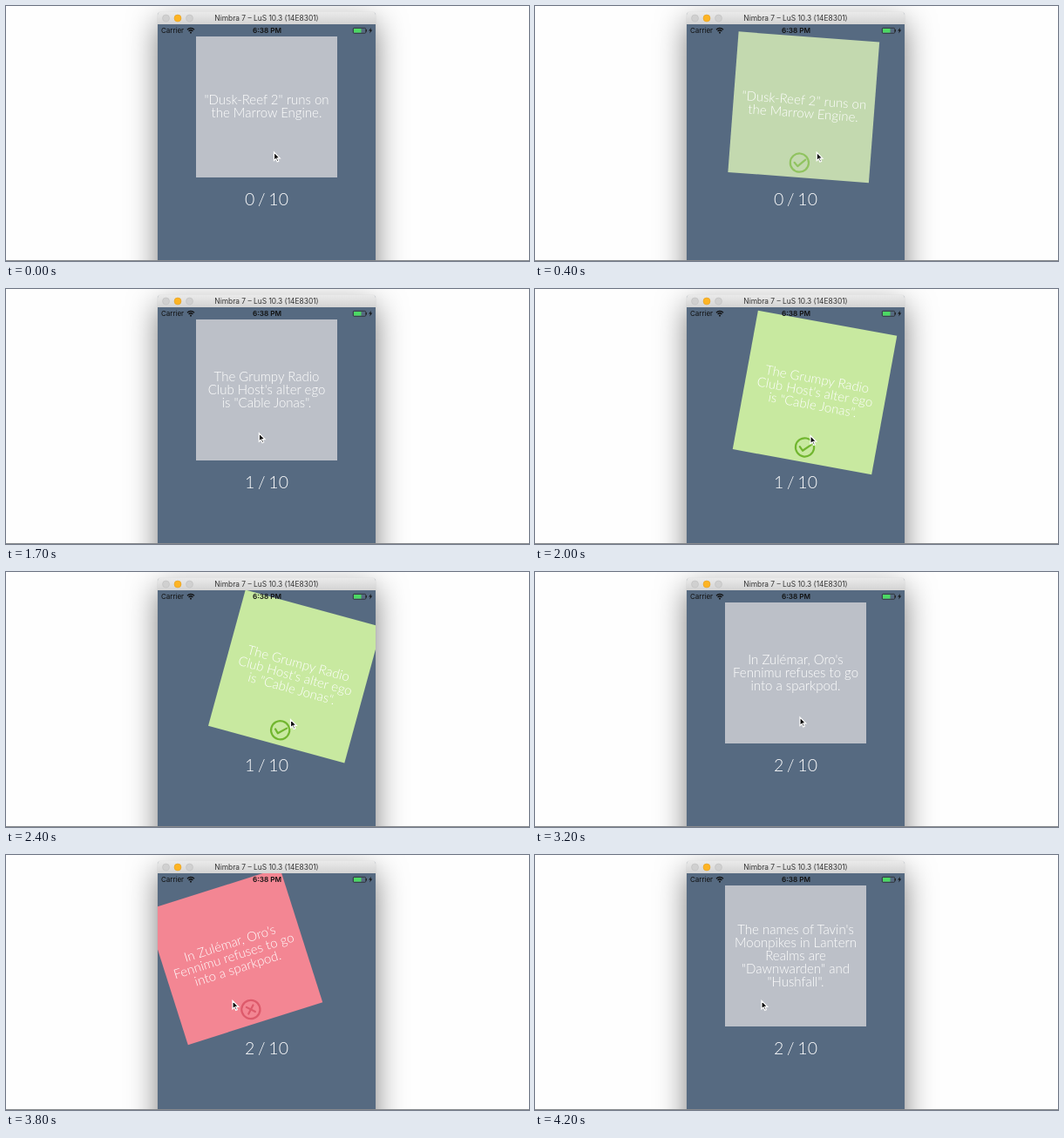
These frames come from a looping animation (600 px wide and 293 px high, 4.4 s). An HTML page:

```html
<!DOCTYPE html>
<html lang="en">
<head>
<meta charset="utf-8">
<title>Quiz cards</title>
<style>
  html, body { margin: 0; width: 100%; height: 100%; overflow: hidden; background: #fefefe; }
  #stage { position: relative; width: 600px; height: 293px; overflow: hidden; }
  #window {
    position: absolute; left: 174px; top: 6.5px; width: 250px; height: 340px;
    border-radius: 4px 4px 0 0; background: #566a81;
    box-shadow: 0 12px 34px rgba(0, 0, 0, .5), 0 0 1px rgba(0, 0, 0, .3);
  }
  svg { position: absolute; left: 0; top: 0; }
  text { text-anchor: middle; }
  .ui { font-family: Inter, "Liberation Sans", sans-serif; fill: #111; }
  .quiz { font-family: Lato, "Open Sans", sans-serif; font-weight: 300; fill: #fff; }
  .icon { fill: none; stroke-width: 2.2; stroke-linecap: round; stroke-linejoin: round; }
</style>
</head>
<body>
<div id="stage">
  <div id="window"></div>
  <svg width="600" height="293" viewBox="0 0 600 293">
    <defs>
      <linearGradient id="bar" x2="0" y2="1">
        <stop stop-color="#ebebeb"/><stop offset="1" stop-color="#d3d3d3"/>
      </linearGradient>
      <clipPath id="screen"><rect x="174" y="21" width="250" height="272"/></clipPath>
    </defs>

    <path d="M174 21V10.5a4 4 0 0 1 4-4h242a4 4 0 0 1 4 4V21Z" fill="url(#bar)"/>
    <g stroke-width=".5">
      <circle cx="183.5" cy="14" r="4" fill="#d0d0d0" stroke="#bbb"/>
      <circle cx="197" cy="14" r="4" fill="#fdb424" stroke="#dd9a20"/>
      <circle cx="210.5" cy="14" r="4" fill="#d0d0d0" stroke="#bbb"/>
    </g>
    <text class="ui" x="299" y="17" font-size="8.4" style="fill:#333">Nimbra 7 – LuS 10.3 (14E8301)</text>

    <g clip-path="url(#screen)">
      <text id="score" class="quiz" x="299" y="228.5" font-size="19.5" word-spacing="-1.5"></text>
      <g id="card">
        <rect id="face" x="-81" y="-81" width="162" height="162"/>
        <g id="lines" class="quiz" font-size="15"></g>
        <g id="icon" class="icon" transform="translate(0 64)">
          <circle r="10.6"/><path id="mark"/>
        </g>
      </g>
    </g>

    <text class="ui" x="191" y="31" font-size="8">Carrier</text>
    <g fill="none" stroke="#111" stroke-width="1.3">
      <path d="M208 27.2a5.6 5.6 0 0 1 8 0M209.6 29a3.4 3.4 0 0 1 4.8 0"/>
      <circle cx="212" cy="30.6" r=".4"/>
    </g>
    <text class="ui" x="299.5" y="31" font-size="8.2" font-weight="600">6:38 PM</text>
    <rect x="398.3" y="25.3" width="14.4" height="6" rx="1" fill="none" stroke="#222" stroke-width=".7"/>
    <rect x="399" y="26" width="8.5" height="4.6" fill="#4cd964"/>
    <path d="M413.4 27v2.6" stroke="#222"/>
    <path d="M419 24.8l-2.8 3.8h1.8l-.8 3 3-4h-1.9Z" fill="#111"/>

    <path d="M0 292.5H600" stroke="#85888c"/>
    <path id="cursor" d="M0 0V9.4L2.2 7.4 3.7 10.9 5.3 10.2 3.8 6.8H6.7Z" stroke="#fff" stroke-width="1.2"/>
  </svg>
</div>
<script>
const LOOP = 4400, STEP = 100;
const SLACK = 6.5;        // pointer travel before a drag takes hold
const DEGREES_PER_PX = 0.47;
const LINE_HEIGHT = 15;

const GRAY = [188, 192, 200];
const RIGHT = { face: [200, 233, 160], stroke: "#71b62f", mark: "M-5.8 .2L-1.8 4.2 6.6-4" };
const WRONG = { face: [243, 134, 147], stroke: "#dd5a6b", mark: "M-4-4L4 4M4-4L-4 4" };

const cards = [
  { from: 0, grab: 100, score: 0, lines: ['"Dusk-Reef 2" runs on', "the Marrow Engine."] },
  { from: 900, grab: 1600, score: 1, lines: ["The Grumpy Radio", "Club Host's alter ego", 'is "Cable Jonas".'] },
  { from: 2600, grab: 3200, score: 2, lines: ["In Zulémar, Oro's", "Fennimu refuses to go", "into a sparkpod."] },
  { from: 3900, grab: LOOP, score: 2, lines: ["The names of Tavin's", "Moonpikes in Lantern", "Realms are", '"Dawnwarden" and', '"Hushfall".'] }
];

// Pointer path: time, x, y
const path = [
  [0, 307.5, 168], [100, 307.5, 168], [700, 339, 168.5], [800, 338, 168.5],
  [1000, 338, 168.5], [1400, 287.5, 165.5], [1600, 287.5, 165.5], [2200, 326, 169.5],
  [2400, 326.5, 169.5], [2800, 326.5, 169.5], [3000, 304, 167], [3200, 304, 167],
  [3700, 259.5, 167.5], [3800, 260, 167.5], [LOOP, 260, 167.5]
];

const $ = id => document.getElementById(id);
const set = (el, attrs) => Object.entries(attrs).forEach(([k, v]) => el.setAttribute(k, v));
const mix = (a, b, p) => a + (b - a) * p;

function pointerAt(t) {
  const i = path.findIndex(key => key[0] > t);
  const [t0, x0, y0] = path[i - 1], [t1, x1, y1] = path[i];
  const p = (t - t0) / (t1 - t0), eased = p * p * (3 - 2 * p);
  return { x: mix(x0, x1, eased), y: mix(y0, y1, eased) };
}

function dragOf(card, t, pointer) {
  if (t < card.grab) return { dx: 0, dy: 0 };
  const start = pointerAt(card.grab), moved = pointer.x - start.x;
  const dx = Math.sign(moved) * Math.max(0, Math.abs(moved) - SLACK);
  return { dx, dy: dx ? pointer.y - start.y : 0 };
}

let shown;
function showCard(card) {
  if (card === shown) return;
  shown = card;
  $("score").textContent = `${card.score} / 10`;
  $("lines").replaceChildren(...card.lines.map((line, i) => {
    const text = document.createElementNS("http://www.w3.org/2000/svg", "text");
    text.textContent = line;
    text.setAttribute("y", (i - (card.lines.length - 1) / 2) * LINE_HEIGHT + 4.5);
    return text;
  }));
}

function draw(now) {
  const t = Math.floor((now % LOOP) / STEP) * STEP;
  const card = cards.findLast(c => c.from <= t);
  const pointer = pointerAt(t);
  const { dx, dy } = dragOf(card, t, pointer);
  const verdict = dx < 0 ? WRONG : RIGHT;
  const strength = Math.min(1, Math.abs(dx) / 15);

  showCard(card);
  set($("card"), { transform: `translate(${299 + dx} ${116 + dy}) rotate(${dx * DEGREES_PER_PX})` });
  set($("face"), { fill: `rgb(${GRAY.map((c, i) => mix(c, verdict.face[i], strength))})` });
  set($("icon"), { opacity: strength, stroke: verdict.stroke });
  set($("mark"), { d: verdict.mark });
  set($("cursor"), { transform: `translate(${pointer.x} ${pointer.y})` });
}

const begin = performance.now();
function tick() {
  draw(performance.now() - begin);
  requestAnimationFrame(tick);
}
tick();
</script>
</body>
</html>
```
